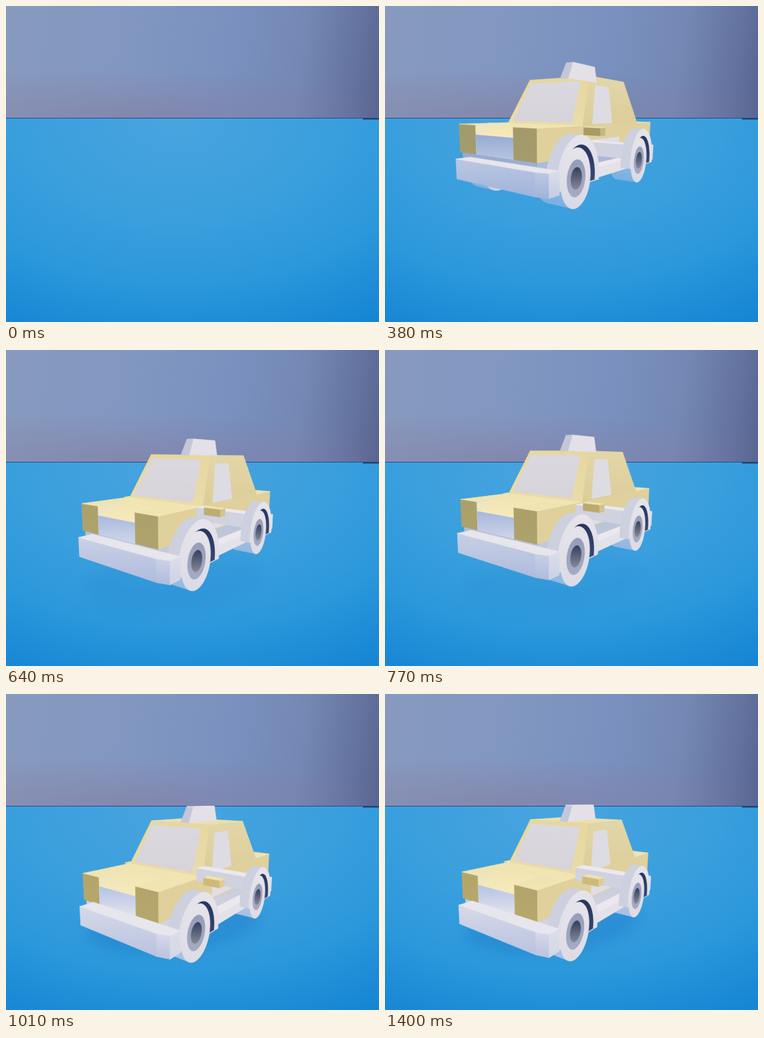
An HTML page with a canvas for the animation above (1.65 s loop, 558 px wide and 472 px high).

```html
<!DOCTYPE html>
<html lang="en">
<head>
<meta charset="utf-8">
<title>Dropping taxi</title>
<style>
  html, body { margin: 0; width: 100%; height: 100%; overflow: hidden; }
  .wall, .floor, canvas { position: absolute; left: 0; }
  .wall {
    top: 0; width: 558px; height: 168px;
    background:
      radial-gradient(75% 45% at 32% 100%, rgba(134, 122, 156, .55), transparent),
      linear-gradient(98deg, #8799be 0, #8298c1 30%, #7a91bf 58%, #7488b4 78%, #64739f 92%, #576490);
  }
  .floor {
    top: 167px; width: 558px; height: 305px;
    background: radial-gradient(105% 125% at 46% 0, #49a4df 0, #3a9fdd 40%, #2b98db 65%, #1c8ad6 85%, #0d7fd1 105%);
    border-top: 1px solid #234e8c; box-sizing: border-box;
  }
  canvas { top: 0; }
</style>
</head>
<body>
<div class="wall"></div>
<div class="floor"></div>
<canvas id="stage" width="558" height="472"></canvas>
<script>
const ctx = document.getElementById('stage').getContext('2d');
const LOOP = 1650, LAST = 11, TAU = 2 * Math.PI;
let lift = 0;

const stepStart = i => 130 * i - 10 * ((i > 1) + (i > 6) + (i > 7));

// A fast fall, then two bounces; the floor lies a little below the resting pose.
function heightAt(t) {
  const hop = (from, to, peak) => 4 * peak * (t - from) * (to - t) / (to - from) ** 2;
  const h = t < 478 ? .68 * (478 - t) ** 1.09
    : t < 1005 ? hop(478, 1005, 51) : hop(1005, 1430, 10.8);
  return h - 3.5;
}

// u: wheelbases behind the front axle, v: car widths to its far side, z: height over the axle.
function project([u, v, z]) {
  const h = z + lift, w = 1 + .379 * u + .243 * v - .00035 * h;
  return [245 + (40 + 141.4 * u - 147.7 * v) / w, 236 + (118 - 28.3 * u - 21 * v - h) / w];
}

// Blend towards the tone seen when the car is high above the floor.
function tone(low, high) {
  const k = Math.max(0, Math.min(1, lift / 200));
  const part = (c, i) => parseInt(c.slice(i, i + 2), 16);
  return 'rgb(' + [1, 3, 5].map(i =>
    Math.round(part(low, i) * (1 - k) + part(high, i) * k)).join() + ')';
}

// Fills an outline with one colour, or a pair running from top to bottom.
function face(verts, paint, cull = false) {
  const pts = verts.map(project);
  const turn = pts.reduce((sum, [x, y], i) => {
    const [a, b] = pts[(i + 1) % pts.length];
    return sum + x * b - a * y;
  }, 0);
  if (cull && turn <= 0) return;
  const ys = pts.map(p => p[1]), [a, b = a] = [paint].flat();
  const fill = ctx.createLinearGradient(0, Math.min(...ys), 0, Math.max(...ys));
  fill.addColorStop(0, a);
  fill.addColorStop(1, b);
  ctx.beginPath();
  pts.forEach(p => ctx.lineTo(...p));
  ctx.closePath();
  ctx.fillStyle = ctx.strokeStyle = fill;
  ctx.lineWidth = .6;
  ctx.fill();
  ctx.stroke();
}

const rect = (u0, u1, v0, v1) => [[u0, v1], [u0, v0], [u1, v0], [u1, v1]];
const at = (plan, z) => plan.map(([u, v]) => [u, v, z]);
const upright = (u0, v0, u1, v1, z0, z1) => [[u0, v0, z1], [u1, v1, z1], [u1, v1, z0], [u0, v0, z0]];

// Walls and lid over a plan; a second plan makes it taper. Returns the walls.
function prism(plan, z0, z1, paint, lid = plan) {
  const low = at(plan, z0), top = at(lid, z1);
  const walls = low.map((p, i) => {
    const j = (i + 1) % low.length;
    return [top[i], top[j], low[j], p];
  });
  walls.forEach(w => {
    const along = Math.abs(w[2][0] - w[3][0]) > Math.abs(w[2][1] - w[3][1]);
    face(w, along ? paint.side : paint.front, true);
  });
  face(top.reverse(), paint.top, true);
  return walls;
}

// Part of a four-cornered face, in fractions of its width and height.
function inset([a, b, c, d], l, t, r, m) {
  const mix = (p, q, k) => p.map((n, i) => n + (q[i] - n) * k);
  const spot = (x, y) => mix(mix(a, b, x), mix(d, c, x), y);
  return [spot(l, t), spot(r, t), spot(r, m), spot(l, m)];
}

function disc(u, v, r, from = 0, to = TAU) {
  return Array.from({ length: 49 }, (_, i) => {
    const a = from + (to - from) * i / 48;
    return [u + r * Math.cos(a) / 258, v, r * Math.sin(a)];
  });
}

function barrel(u, v0, v1, r, paint, ...span) {
  for (let i = 0; i <= 8; i++) face(disc(u, v0 + (v1 - v0) * i / 8, r, ...span), paint);
}

function shadow() {
  const a = .2 * Math.min(1, Math.max(0, 1 - lift / 60));
  if (!a) return;
  ctx.save();
  ctx.filter = 'blur(9px)';
  ctx.fillStyle = `rgba(8, 92, 184, ${a})`;
  ctx.beginPath();
  ctx.ellipse(250, 345, 130, 42, -.1, 0, TAU);
  ctx.fill();
  ctx.restore();
}

function below() {
  const rubber = [tone('#bcc8e2', '#8fb4de'), tone('#a9c0e4', '#4a9fdb')];
  face(at(rect(-.25, 1.46, .1, 1), -10), ['#4c9edb', '#56aae2'], true);
  for (const u of [1, 0]) {
    barrel(u, 1.1, .87, 44, rubber);
    face(disc(u, .87, 44), tone('#d3d7e6', '#c3cce2'));
    barrel(u, .24, 0, 44, rubber);
  }
}

const yellow = { front: '#e6d79f', side: '#dfd09c', top: ['#efe3b0', '#f1e5b4'] };
const white = { front: '#d0d2e0', side: '#e4e2e9', top: '#ebe9ee' };
const mirrorPaint = () => ({
  front: tone('#cdb97a', '#7f7b52'), side: tone('#dfcd92', '#a79f70'), top: '#f0e2ad'
});

function cabin() {
  const paint = { front: ['#e6d79f', '#eadca8'], side: ['#e3d6a8', '#dccd99'], top: '#ecdfae' };
  const [screen, flank] = prism(rect(.22, 1.157, .12, 1), 72, 152, paint, rect(.42, .98, .2, .92));
  face(inset(screen, .06, .1, .87, .95), ['#dad8e0', '#d7d3d9'], true);
  face(inset(flank, .14, .18, .47, .97), '#dedce3');
  prism(rect(.46, .9, .47, .57), 152, 181, { front: '#c5c6d7', side: '#e3e0e7', top: '#eeebf0' },
    rect(.52, .86, .47, .55));
}

function hood() {
  const olive = '#908f6c';
  const lamp = { ...yellow, front: [tone('#b3a56a', olive), tone('#b6a86c', olive)] };
  prism(rect(-.266, 0, .78, 1), 27, 72, { ...lamp, side: '#efe5c2' });
  face([[0, .78, 72], [0, .35, 72], [-.266, .35, 57], [-.266, .78, 57]], ['#f1e5b4', '#f6eabd'], true);
  face(upright(-.266, .78, -.266, .35, 27, 57),
    [tone('#b5c3e6', '#7690be'), tone('#e2e3ed', '#8aa6d3')]);
  prism(rect(-.266, 0, .12, .35), 27, 72, lamp);
}

function wheel(u) {
  const span = [-.15, Math.PI + .15], v = -.03;
  barrel(u, .07, v, 62, '#cdd0df', ...span);
  face(disc(u, v, 49, ...span), ['#27355e', '#3c4d78']);
  face([...disc(u, v, 62, ...span), ...disc(u, v, 49, ...span).reverse()], ['#e6e4ea', '#dcdde7']);
  face(disc(u, 0, 44), ['#e6e4ea', tone('#dddce6', '#d5d8e6')]);
  face(disc(u, 0, 27), ['#969db9', '#a5abc3']);
  face(disc(u, 0, 16), ['#34405f', '#858896']);
}

function draw() {
  ctx.clearRect(0, 0, 558, 472);
  ctx.fillStyle = '#24375f';
  ctx.fillRect(534, 168, 24, 1.5);
  shadow();
  below();

  prism(rect(-.25, 1.46, .13, .99), -10, 28, {
    front: [tone('#c9cee0', '#6482b2'), tone('#d4d8e8', '#7c9acb')],
    side: [tone('#c9cbda', '#7f9ac8'), tone('#d6d7e3', '#8fb0da')], top: white.top
  });
  prism(rect(.235, .3, 1, 1.1), 58, 70, mirrorPaint());
  prism(rect(0, 1.49, .12, 1), 28, 72, yellow);
  cabin();
  hood();
  face(upright(.36, .12, .8, .12, 30, 48), '#e0dee5');
  prism(rect(.1, .9, .02, .13), -10, 7, white);
  prism(rect(1.25, 1.4, .03, 1), -9, 23, white);
  wheel(1);
  wheel(0);

  const [back, ...edge] = rect(-.295, -.17, .01, 1.02);
  prism([back, [-.295, .11], [-.27, .01], ...edge.slice(1)], -17, 16, {
    front: [tone('#d6d9e9', '#a0b3da'), tone('#b9c2df', '#86a5d6')],
    side: ['#dcdde8', tone('#d3d7e6', '#b3c3e2')], top: '#e7e6ed'
  });
  prism(rect(.235, .3, -.04, .12), 58, 70, mirrorPaint());
}

function tick(now) {
  const t = now % LOOP;
  let i = LAST;
  while (stepStart(i) > t) i--;
  lift = heightAt(stepStart(i));
  draw();
  requestAnimationFrame(tick);
}
requestAnimationFrame(tick);
</script>
</body>
</html>
```
